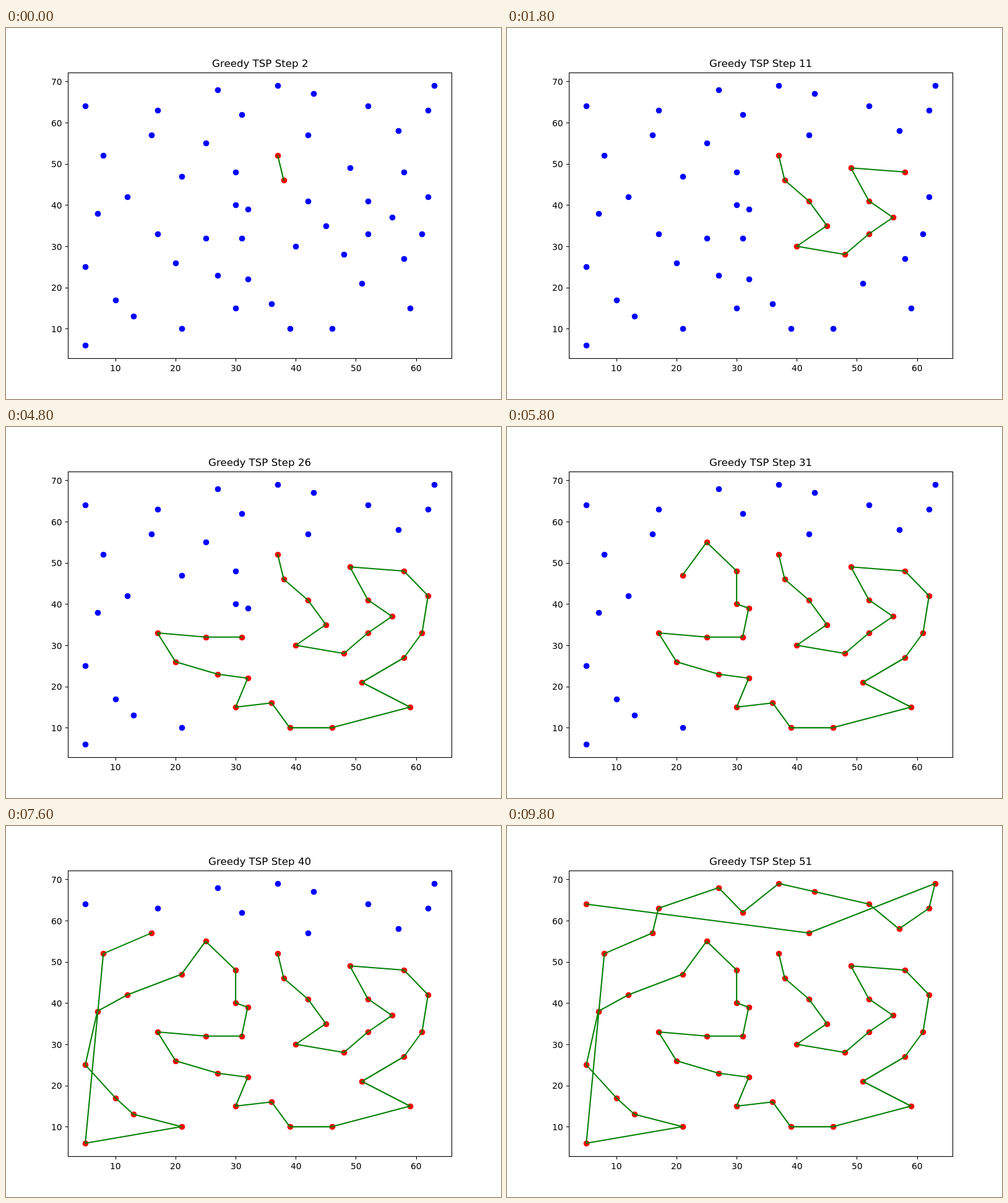
An HTML page with a canvas for the animation above (10 s loop, 800 px wide and 600 px high).

```html
<!DOCTYPE html>
<html lang="en">
<head>
<meta charset="utf-8">
<title>Greedy tour</title>
<style>
  html, body { margin: 0; width: 100%; height: 100%; overflow: hidden; background: #fff; }
  canvas { display: block; }
</style>
</head>
<body>
<canvas id="stage" width="800" height="600"></canvas>
<script>
const ctx = document.getElementById('stage').getContext('2d');

const STEP_MS = 200;
const PT = 100 / 72; // pixels per typographic point
const BOX = { left: 100, top: 72, right: 720, bottom: 534 };

// City map: x, then every y in that column
const columns = {
  5: [6, 25, 64], 7: [38], 8: [52], 10: [17], 12: [42], 13: [13], 16: [57],
  17: [33, 63], 20: [26], 21: [10, 47], 25: [32, 55], 27: [23, 68],
  30: [15, 40, 48], 31: [32, 62], 32: [22, 39], 36: [16], 37: [52, 69],
  38: [46], 39: [10], 40: [30], 42: [41, 57], 43: [67], 45: [35], 46: [10],
  48: [28], 49: [49], 51: [21], 52: [33, 41, 64], 56: [37], 57: [58],
  58: [27, 48], 59: [15], 61: [33], 62: [42, 63], 63: [69]
};
const cities = Object.entries(columns)
  .flatMap(([x, ys]) => ys.map(y => ({ x: +x, y })));

// Always moves on to the nearest city not yet visited
function greedyTour(start) {
  const path = [start];
  const open = new Set(cities);
  open.delete(start);
  while (open.size) {
    const here = path[path.length - 1];
    const dist = c => Math.hypot(c.x - here.x, c.y - here.y);
    const next = [...open].reduce((a, b) => dist(b) < dist(a) ? b : a);
    path.push(next);
    open.delete(next);
  }
  return path;
}
const tour = greedyTour(cities.find(c => c.x === 37 && c.y === 52));

// Linear scale with a 5 % margin on both sides of the data
function scale(axis, from, to) {
  const values = cities.map(c => c[axis]);
  const min = Math.min(...values), max = Math.max(...values);
  const pad = (max - min) * 0.05;
  return v => from + (v - min + pad) / (max - min + 2 * pad) * (to - from);
}
const px = scale('x', BOX.left, BOX.right);
const py = scale('y', BOX.bottom, BOX.top);
const snap = v => Math.round(v + 1e-6) + 0.5;

// Text on whole pixels: align 0.5 centres it at x, 1 ends it there
function label(text, x, y, size, align) {
  ctx.font = `${size * PT}px "DejaVu Sans", sans-serif`;
  const width = ctx.measureText(text).width;
  ctx.fillText(text, Math.round(x - width * align + 0.3), Math.round(y));
}

function segment(x1, y1, x2, y2) {
  ctx.beginPath();
  ctx.moveTo(x1, y1);
  ctx.lineTo(x2, y2);
  ctx.stroke();
}

function drawDots(count) {
  tour.forEach(({ x, y }, i) => {
    ctx.fillStyle = i < count ? '#f00' : '#00f';
    ctx.beginPath();
    ctx.arc(snap(px(x)), snap(py(y)), 3.5 * PT, 0, Math.PI * 2);
    ctx.fill();
  });
}

function drawPath(count) {
  ctx.strokeStyle = '#008000';
  ctx.lineWidth = 1.5 * PT;
  ctx.lineJoin = 'round';
  ctx.lineCap = 'square';
  ctx.beginPath();
  tour.slice(0, count).forEach(({ x, y }) => ctx.lineTo(px(x), py(y)));
  ctx.stroke();
}

function drawAxes() {
  const tick = 3.5 * PT;
  ctx.strokeStyle = ctx.fillStyle = '#000';
  ctx.lineWidth = 0.8 * PT;
  ctx.lineJoin = 'miter';
  ctx.lineCap = 'butt';
  ctx.strokeRect(BOX.left + 0.5, BOX.top + 0.5, BOX.right - BOX.left, BOX.bottom - BOX.top);
  for (let v = 10; v <= 70; v += 10) {
    const y = snap(py(v));
    segment(BOX.left + 0.5, y, BOX.left + 0.5 - tick, y);
    label(v, BOX.left - 2 * tick, py(v) + 5.6, 10, 1);
    if (v > 60) continue;
    const x = snap(px(v));
    segment(x, BOX.bottom + 0.5, x, BOX.bottom + 0.5 + tick);
    label(v, px(v), 555, 10, 0.5);
  }
}

function draw(time) {
  const count = 2 + Math.floor(time / STEP_MS) % (tour.length - 1);
  ctx.fillStyle = '#fff';
  ctx.fillRect(0, 0, 800, 600);
  drawDots(count);
  drawPath(count);
  drawAxes();
  label(`Greedy TSP Step ${count}`, (BOX.left + BOX.right) / 2, 63, 12, 0.5);
}

const start = performance.now();
function loop() {
  draw(performance.now() - start);
  requestAnimationFrame(loop);
}
loop();
</script>
</body>
</html>
```
